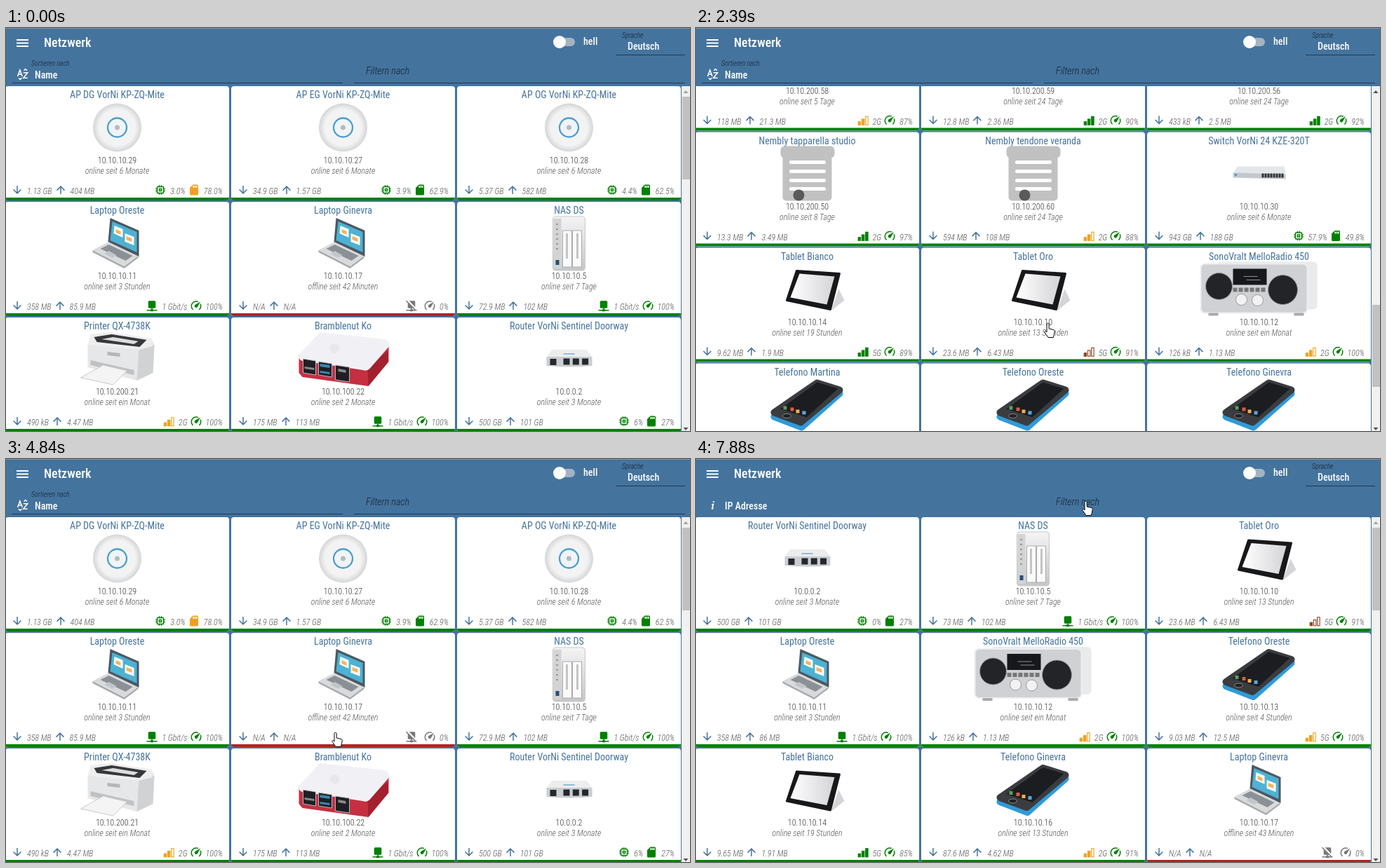
Animation, 975 px wide and 575 px high, one loop 8 s. Source, as an HTML page:

```html
<!DOCTYPE html>
<html lang="de">
<meta charset="utf-8">
<title>Netzwerk</title>
<style>
html, body { margin: 0; width: 975px; height: 575px; overflow: hidden }
body { position: relative; background: #44739e; color: #fff;
  font: 14px/20px "Roboto Condensed", Roboto, sans-serif; font-stretch: 75% }
.wide * { letter-spacing: -.055em }
body > *, .card, .card > * { position: absolute; white-space: nowrap }
.edge { inset: 0 0 auto; height: 1px; background: #87939e }
.line { height: 1px; background: #22394f }
.label { font: italic 300 10px/12px "Roboto Condensed", Roboto, sans-serif; font-stretch: 75%; color: #14222f }
.strong { font-weight: 500 }
.icon { width: 18px; height: 18px; fill: currentColor; flex: none }
.list { left: 0; top: 83px; width: 963px; height: 492px; overflow: hidden }
.card { height: 163px; background: #fff; border-radius: 4px; overflow: hidden; text-align: center; font-size: 12px; line-height: 14px; color: #555 }
.card > * { left: 0; right: 0 }
.name { top: 2px; font-size: 14px; line-height: 20px; color: #44739e }
.pic { top: 17px; width: 100%; height: 84px }
.ip { top: 99px; font-weight: 300; color: #333 }
.since { top: 114px; font-weight: 300; font-style: italic }
.stats { top: 139px; height: 18px; padding: 0 9px 0 8px; display: flex; align-items: center; font-weight: 300; font-style: italic }
.stats span { margin: 3px 3px 0 5px }
.stats span:last-child { margin-right: 0 }
.stats .icon { color: #44739e }
.stats i { flex: 1 }
.bar { bottom: 0; height: 4px }
.scroll { left: 963px; top: 83px; width: 12px; height: 492px; background: #f1f1f1 }
.thumb { left: 964px; width: 11px; height: 117.5px; background: #c1c1c1 }
.menu { left: 9px; top: 79px; width: 472px; height: 241px; background: #fff; border-radius: 4px; overflow: hidden;
  color: #44739e; box-shadow: 0 4px 8px #0006, 0 1px 3px #0005 }
.menu div { display: flex; align-items: center; gap: 10px; height: 34.4px; padding-left: 14px }
.menu .hover { background: #f6f6f6 }
.menu div:first-child { background: #dfdfdf }
.cursor { width: 24px; height: 26px; overflow: visible }
</style>
<body>
<svg width="0" height="0">
  <defs id="defs">
    <radialGradient id="dome"><stop offset=".75" stop-color="#f3f3f3"/><stop offset="1" stop-color="#d3d5d7"/></radialGradient>
    <linearGradient id="glass"><stop stop-color="#fff"/><stop offset="1" stop-color="#d4d4d8"/></linearGradient>
    <linearGradient id="shell" x2="0" y2="1"><stop stop-color="#f4f4f5"/><stop offset="1" stop-color="#c4c6c9"/></linearGradient>

    <path id="down" d="M11 4h2v12l5.5-5.5 1.42 1.42L12 19.84 4.08 11.92 5.5 10.5 11 16z"/>
    <use id="up" href="#down" transform="rotate(180 12 12)"/>
    <path id="chip" d="M17 17H7V7h10m4 4V9h-2V7a2 2 0 0 0-2-2h-2V3h-2v2h-2V3H9v2H7a2 2 0 0 0-2 2v2H3v2h2v2H3v2h2v2a2 2 0 0 0 2 2h2v2h2v-2h2v2h2v-2h2a2 2 0 0 0 2-2v-2h2v-2h-2v-2h2m-8 2h-2v-2h2m2-2H9v6h6z"/>
    <path id="sd" d="M18 2H10L4 8v12a2 2 0 0 0 2 2h12a2 2 0 0 0 2-2V4a2 2 0 0 0-2-2m-6 6h-2V4h2m3 4h-2V4h2m3 4h-2V4h2z"/>
    <path id="net" d="M17 3a2 2 0 0 1 2 2v10a2 2 0 0 1-2 2h-4v2h1a1 1 0 0 1 1 1h7v2h-7a1 1 0 0 1-1 1h-4a1 1 0 0 1-1-1H2v-2h7a1 1 0 0 1 1-1h1v-2H7a2 2 0 0 1-2-2V5a2 2 0 0 1 2-2z"/>
    <g id="off"><use href="#net"/><path d="M4 2l17 18" stroke="#fff" stroke-width="4"/><path d="M2 3l18 18" stroke="currentColor" stroke-width="2"/></g>
    <g id="linked"><use href="#net"/><path d="M8 10l3 3 5-6" fill="none" stroke="#fff" stroke-width="2"/></g>
    <path id="gauge" d="M12 16a3 3 0 0 1-3-3c0-1.12.61-2.1 1.5-2.61l9.71-5.62-5.53 9.58c-.5.98-1.51 1.65-2.68 1.65M12 3c1.81 0 3.5.5 4.97 1.32l-2.1 1.21C14 5.19 13 5 12 5a8 8 0 0 0-8 8c0 2.21.89 4.21 2.34 5.65.39.39.39 1.02 0 1.41-.39.39-1.03.39-1.42.01A9.97 9.97 0 0 1 2 13 10 10 0 0 1 12 3m10 10c0 2.76-1.12 5.26-2.93 7.07-.39.38-1.02.38-1.41-.01a1 1 0 0 1 0-1.41A7.95 7.95 0 0 0 20 13c0-1-.19-2-.54-2.9L20.67 8C21.5 9.5 22 11.18 22 13z"/>
    <use id="half" href="#gauge" transform="rotate(-45 12 13)"/>
    <path id="az" d="M2 16L6.5 4 11 16M4 12h5M13 9h8l-8 10h8M14 5l3-3 3 3M4 19l3 3 3-3" fill="none" stroke="currentColor" stroke-width="2"/>
    <path id="info" d="M13.5 4a1.5 1.5 0 1 0 .01 3 1.5 1.5 0 0 0 0-3m-.36 4.77c-1.19.1-4.44 2.69-4.44 2.69l.35.58 1.08-.68c2.12-1.36.34 1.78-.57 7.07-.36 2.62 2 1.27 2.61.87l2.37-1.61-.35-.57c-.65.43-1.84 1.33-2 .76-.19-.57 1.03-4.48 1.7-7.17.11-.64.41-2.04-.75-1.94z"/>
    <path id="clock" d="M12 21a9 9 0 1 1 9-9M12 7v6l4 2M14 18l3 3 5-5" fill="none" stroke="currentColor" stroke-width="2"/>

    <g id="ap"><circle r="34.5" fill="url(#dome)"/><circle r="13.5" fill="#f0f4f7" stroke="#4a9fd0" stroke-width="2.3"/><circle r="3.5" fill="#b5babf"/></g>
    <g id="laptop"><path fill="#a6a9ad" d="M-35 10L10 33 30 18v3L10 36-35 13z"/><path fill="#d9dadc" d="M-12-2L30 18 10 33-35 10z"/>
      <path fill="#8b9096" d="M-12 2L22 18 12 25-24 8z"/><path fill="#c3c6c9" d="M-18 15l6-4 11 6-6 4z"/>
      <path fill="#4c5862" d="M-10-36L31-18V19L-13-2z"/><path fill="#4db2d3" d="M-7-31L28-16V13L-10-4z"/>
      <path fill="#fff" d="M-4-25L8-20V-8L-5-14zM11-14l13 5v12L11-2z"/><path fill="#f2b45a" d="M-2-20l7 3v5l-7-3zM13-10l8 3v5l-8-3z"/></g>
    <g id="nas"><rect x="-23" y="-38" width="46" height="77" rx="4" fill="url(#shell)" stroke="#c9c9c9"/><path fill="#d2d3d5" d="M-22-35h11v71h-11z"/>
      <path fill="#fafafa" stroke="#aaa" d="M-9-18H4v52H-9zM5-18h13v52H5z"/><path stroke="#c4c4c4" stroke-width="3" d="M-3-14v36M12-14v36"/>
      <path stroke="#999" stroke-width="3" stroke-dasharray="2 5" d="M-17-28V14"/><path fill="#2b4d75" d="M-19 24h5v7h-5z"/></g>
    <g id="printer"><path fill="#e6e7e8" d="M-42-20L-35-24 50-26 53-20 51 20 28 31-42 12z"/><path fill="#d0d2d4" d="M31-13L53-20 51 20 28 31z"/>
      <path fill="#eee" d="M-38-35L-8-38 50-29V-18L31-13-42-20z"/><path fill="#36383a" d="M-33-31L-8-35 42-27 32-17-29-24z"/><path fill="#ddd" d="M-22-28L-6-31 30-25 24-21z"/>
      <path fill="#bfc1c3" d="M-38 2l62 14v7L-38 9z"/><path fill="#f4f4f4" stroke="#c8c8c8" d="M-52 27L-20 9 14 17-6 37z"/><path fill="#b4b6b8" d="M-14-10l18 2v5l-18-2z"/></g>
    <g id="berry"><path fill="#c62f42" d="M-63-6L35 12 65-20V4L36 39-58 26-63 20z"/><path fill="#a3202f" d="M35 14L64-12V5L36 39z"/>
      <path fill="#f1f1f5" d="M-33-38L58-28Q68-26 65-17L38 14Q34 18 28 16L-58 3Q-65 1-63-6z"/><circle cx="-12" cy="-15" r="7" fill="#e7e7ed"/>
      <path fill="#1d1f24" stroke="#b6b8bc" d="M-57 0l18 3v20l-18-3zM-35 4l19 3v19l-19-3zM-11 9L9 12v21L-11 30z"/><path fill="#3a86b5" d="M-33 7l14 2v4l-14-2zM-33 17l14 2v3l-14-2z"/><path fill="#888" d="M-55 11l14 2v3l-14-2zM-7 14l11 2v4l-11-2z"/></g>
    <g id="router"><path fill="#ededee" d="M-24-13H25L33-3H-32z"/><path fill="#cbced1" d="M-32-3H33V10Q0 13-32 10z"/><path d="M-8-7H8" stroke="#8bbde2" stroke-width="2"/>
      <path stroke="#24282c" stroke-width="9" stroke-dasharray="9 4.3" d="M-8 4H28"/><path fill="#24282c" d="M-27 0h9v9h-9z"/></g>
    <circle id="badge" cx="-12" cy="31" r="8" fill="#5a5a5a"/>
    <g id="fork"><g fill="none" stroke="#c1c1c1" stroke-width="8"><circle cx="-20" cy="-27" r="8"/><circle cx="21" cy="-27" r="8"/><circle cx="-20" cy="27" r="8"/><circle cx="21" cy="27" r="8"/>
      <path d="M-20-18C-20 8 21-8 21 18M21-18C21 8-20-8-20 18"/></g><use href="#badge"/></g>
    <g id="bulb"><path fill="#c1c1c1" d="M-25-13a25 25 0 0 1 50 0C25 2 13 6 13 16H-13C-13 6-25 2-25-13zM-13 20H13V31Q8 39 0 39-8 39-13 31z"/><use href="#badge"/></g>
    <g id="blind"><rect x="-38" y="-39" width="77" height="17" rx="6" fill="#c1c1c1"/><rect x="-35" y="-30" width="70" height="69" rx="5" fill="#c1c1c1"/>
      <path stroke="#fff" stroke-width="5" stroke-linecap="round" d="M-23-16H24M-23-3H24M-23 10H24M-23 22H24"/><use href="#badge"/></g>
    <g id="sensor"><g fill="none" stroke="#c1c1c1"><circle r="35" stroke-width="7"/><circle cx="11" cy="-18" r="16" stroke-width="5" stroke-dasharray="3 5.4"/></g>
      <path fill="#c1c1c1" d="M0-18a11 11 0 0 0 22 4L4-27zM-20 2q-12 16 0 17 10-1 0-17zM-8-6q-9 13 0 14 9-1 0-14zM-3 9q-8 12 0 13 8-1 0-13z"/><use href="#badge"/></g>
    <g id="tablet"><path fill="#d5d5d7" d="M45 0l8 16L34 31z"/><path fill="#17181a" stroke="#17181a" stroke-width="3" stroke-linejoin="round" d="M-15-26L46-22 33 29-29 16z"/><path fill="url(#glass)" d="M-11-22L39-18 28 22-24 12z"/></g>
    <g id="phone" stroke-linejoin="round"><path fill="#2f9bd8" stroke="#2f9bd8" stroke-width="10" d="M14-27L46-16-8 32-47 17z"/><path fill="#3b3c40" stroke="#3b3c40" stroke-width="10" d="M14-31L46-21-9 25-47 11z"/>
      <path fill="#1c1d20" d="M14-32L44-23-1 18-38 6z"/><ellipse cx="-29" cy="16" rx="6" ry="3" fill="#222" stroke="#888"/>
      <path fill="#5aa05a" d="M-34 2h5v5h-5z"/><path fill="#e05a3a" d="M-24 4h5v5h-5z"/><path fill="#f0b050" d="M-16 7h5v5h-5z"/><path fill="#58a8e0" d="M-7 9h5v5h-5z"/></g>
    <g id="radio"><rect x="-60" y="-39" width="143" height="68" rx="6" fill="#e9eaec"/><rect x="-83" y="-36" width="152" height="70" rx="6" fill="#cfd1d4" stroke="#eee" stroke-width="2"/>
      <path fill="#aaa" d="M-72 34h14v4h-14zM50 34h14v4H50z"/><g fill="#222427" stroke="#999"><circle cx="-57" cy="-4" r="19"/><circle cx="34" cy="1" r="21"/></g>
      <path fill="#16181b" d="M-37-29H11V-6H-37z"/><path stroke="#8a9096" d="M-22-18H-2M-18-13H2"/><path stroke="#777" stroke-width="6" stroke-dasharray="6 2" d="M-37 1H11"/>
      <g fill="#f2f2f3" stroke="#999"><circle cx="-25" cy="15" r="8"/><circle cx="-2" cy="16" r="8"/></g></g>
    <g id="tv"><path stroke="#333" d="M13-26L45-39M13-26L11-40"/><path fill="#fff" stroke="#000" stroke-width="8" d="M-41-18Q-38-27-6-27 29-27 31-18 35 18 29 30 0 37-34 30-42 6-41-18z"/>
      <path fill="none" stroke="#000" stroke-width="3" d="M-33-17l8 9 1-7 10 10 1-8 10 9 1-8 12 9 1-8 12 9M-34-2l9 9 1-8 10 10 1-8 10 9 1-8 12 9 1-8 12 9M-32 12l9 8 1-7 10 9 1-7 10 8 1-7 12 8"/></g>
    <g id="camera"><path fill="#ececec" d="M-55-24L12-40 46-8-8-20z"/><path fill="#c2c2c4" d="M-8-20L46-8V14L-8 32z"/><path fill="#e2e2e3" d="M-55-22H-8V32H-49z"/><path fill="#333" d="M-37-12h27v26h-27z"/><circle cx="-23" cy="1" r="7" fill="#111" stroke="#777"/><path fill="#aaa" d="M18 18h12v12h26v9H18z"/></g>
    <g id="switch"><path fill="#e4e7ea" d="M-31-10H36L38 0H-37z"/><path fill="#c2c8ce" d="M-37-1L38 1V8L-37 6z"/><path stroke="#333" stroke-width="6" stroke-dasharray="3 1" d="M4 3H35"/><circle cx="-33" cy="2" r="2" fill="#5b9fd0"/></g>

    <g stroke="#000" fill="#fff"><path id="arrow" d="M0 0v15l3.5-3.2 2.6 5.7 2.3-1-2.6-5.6h4.5z"/>
      <path id="hand" d="M-2 2c0-2.4 3.2-2.4 3.2 0v6l6 1.4c1.6.4 2.2 1.3 2 2.8l-.8 4.6L7.200 20.500H0L-4.800 13.500c-1-1.600.800-2.500 1.600-1.700L-2 13z"/></g>
  </defs>
</svg>
<div class="edge"></div>
<svg style="left:15px;top:15px" width="17" height="14"><path d="M0 2h17M0 6.500h17M0 11h17" stroke="#fff" stroke-width="2"/></svg>
<div class="strong" id="heading" style="left:54px;top:11px;font-size:18px">Netzwerk</div>
<svg style="left:778px;top:9px" width="36" height="22"><rect x="6" y="5" width="27" height="12" rx="6" fill="#a4b3c2"/><circle cx="11" cy="11" r="9" fill="#fff"/></svg>
<div class="strong" style="left:823px;top:9px">hell</div>
<div class="label" style="left:878px;top:5px">Sprache</div>
<div class="strong" style="left:886px;top:16px">Deutsch</div>
<div class="line" style="left:869px;top:38px;width:99px"></div>
<div class="label" id="sortLabel" style="left:36px;top:45px">Sortieren nach</div>
<div class="strong" id="sortValue" style="left:15px;top:57px;display:flex;gap:8px"></div>
<div class="line" id="sortLine" style="left:8px;top:78px;width:472px"></div>
<div class="label" style="left:513px;top:55px;font-size:14px">Filtern nach</div>
<div class="line" id="filterLine" style="left:496px;top:78px;width:472px"></div>
<div class="list"><div id="byName"></div><div id="byIp"></div></div>
<div class="scroll"></div>
<div class="thumb" id="thumb"></div>
<svg style="left:963px;top:83px" width="12" height="492"><path id="upArrow" d="M2.500 10h7L6 6z"/><path d="M2.500 487h7L6 491z" fill="#505050"/></svg>
<div class="menu" id="menu"></div>
<svg class="cursor" id="cursor"><use id="pointer"/></svg>

<script>
const $ = id => document.getElementById(id);
const GREEN = '#008000', ORANGE = '#f0a01e', GRAY = '#777';

// name | picture | address | since | received | sent | link | link value | quality
const devices = `AP DG VorNi KP-ZQ-Mite|ap|10.10.10.29|6 Monate|1.13 GB|404 MB|chip|3.0%|78.0%
AP EG VorNi KP-ZQ-Mite|ap|10.10.10.27|6 Monate|34.9 GB|1.57 GB|chip|3.9%|62.9%
AP OG VorNi KP-ZQ-Mite|ap|10.10.10.28|6 Monate|5.37 GB|582 MB|chip|4.4%|62.5%
Laptop Oreste|laptop|10.10.10.11|3 Stunden|358 MB|85.9 MB|net|1 Gbit/s|100%
Laptop Ginevra|laptop|10.10.10.17|42 Minuten|N/A|N/A|off||0%
NAS DS|nas|10.10.10.5|7 Tage|72.9 MB|102 MB|net|1 Gbit/s|100%
Printer QX-4738K|printer|10.10.200.21|ein Monat|490 kB|4.47 MB|s2|2G|100%
Bramblenut Ko|berry|10.10.100.22|2 Monate|175 MB|113 MB|net|1 Gbit/s|100%
Router VorNi Sentinel Doorway|router|10.0.0.2|3 Monate|500 GB|101 GB|chip|6%|27%
Nembly controllo portatile|fork|10.10.200.80|7 Tage|14.9 MB|1.81 MB|s1|2G|89%
Nembly luce studio|bulb|10.10.200.71|ein Monat|14.7 MB|4.2 MB|s3|2G|88%
Nembly luci bar|bulb|10.10.200.72|ein Monat|777 MB|134 MB|s2|2G|95%
Nembly luci salotto|bulb|10.10.200.70|24 Tage|12.7 MB|2.46 MB|s3|2G|85%
Nembly sensore H&amp;T 2. piano|sensor|10.10.200.90|19 Minuten|N/A|N/A|off||0%
Nembly sensore H&amp;T cantina|sensor|10.10.200.91|3 Stunden|N/A|N/A|off||0%
Nembly tapparella bagno|blind|10.10.200.52|12 Tage|9.24 MB|1.71 MB|s3|2G|95%
Nembly tapparella bambine|blind|10.10.200.54|24 Tage|436 kB|2.51 MB|s3|2G|100%
Nembly tapparella bambino|blind|10.10.200.51|14 Tage|9.17 MB|1.69 MB|s3|2G|92%
Nembly tapparella cucina|blind|10.10.200.57|15 Tage|12.9 MB|2.36 MB|s2|2G|87%
Nembly tapparella doccia|blind|10.10.200.55|12 Tage|462 kB|2.73 MB|s3|2G|93%
Nembly tapparella genitori|blind|10.10.200.53|3 Tage|13.7 MB|2.51 MB|s3|2G|95%
Nembly tapparella sala pranzo|blind|10.10.200.58|5 Tage|118 MB|21.3 MB|s2|2G|87%
Nembly tapparella salotto|blind|10.10.200.59|24 Tage|12.8 MB|2.36 MB|s3|2G|90%
Nembly tapparella stanza giochi|blind|10.10.200.56|24 Tage|433 kB|2.5 MB|s3|2G|92%
Nembly tapparella studio|blind|10.10.200.50|8 Tage|13.3 MB|3.49 MB|s3|2G|97%
Nembly tendone veranda|blind|10.10.200.60|24 Tage|594 MB|108 MB|s2|2G|88%
Switch VorNi 24 KZE-320T|switch|10.10.10.30|6 Monate|943 GB|188 GB|chip|57.9%|49.8%
Tablet Bianco|tablet|10.10.10.14|19 Stunden|9.62 MB|1.9 MB|s3|5G|89%
Tablet Oro|tablet|10.10.10.10|13 Stunden|23.6 MB|6.43 MB|s1|5G|91%
SonoVralt MelloRadio 450|radio|10.10.10.12|ein Monat|126 kB|1.13 MB|s2|2G|100%
Telefono Martina|phone|10.10.10.20|15 Stunden|324 MB|63 MB|s2|2G|69%
Telefono Oreste|phone|10.10.10.13|4 Stunden|9.03 MB|12.5 MB|s3|5G|100%
Telefono Ginevra|phone|10.10.10.16|13 Stunden|87.6 MB|4.6 MB|s2|2G|82%
Televisore Velkora|tv|10.10.10.22|2 Stunden|215 MB|9.4 MB|s3|5G|96%
Qevi security camera|camera|10.10.200.30|9 Tage|48.2 MB|310 MB|s2|2G|90%`.split('\n').map(row => row.split('|'));

// device index and the fields refreshed since the first listing
const ipOrder = [[8, {7: '0%'}], [5, {4: '73 MB'}], [28], [3, {5: '86 MB'}], [29], [31, {6: 's2'}],
  [27, {4: '9.65 MB', 5: '1.91 MB', 8: '85%'}], [32, {5: '4.62 MB', 8: '91%'}], [4, {3: '43 Minuten'}]];

const linkColors = {s1: '#9a3f1c', s2: ORANGE, off: GRAY};

const icon = (name, color = '') =>
  `<svg class="icon" viewBox="0 0 24 24" style="color:${color}"><use href="#${name}"/></svg>`;

function card([name, pic, ip, since, received, sent, link, value, quality], i) {
  const columns = i < 33 ? 3 : 2, column = i < 33 ? i % 3 : i - 33, pitch = 966 / columns;
  const row = Math.min(11, Math.floor(i / 3)), offline = link === 'off', level = parseFloat(quality);
  const second = link === 'chip' ? icon('sd', level > 75 ? ORANGE : GREEN)
    : offline ? icon('gauge', GRAY)
    : level < 70 ? icon('half', ORANGE) : icon('gauge', GREEN);
  return `<div class="card" style="left:${column * pitch - 1}px;top:${row * 165}px;width:${pitch - 3}px">
    <div class="name">${name}</div>
    <svg class="pic" viewBox="-90 -42 180 84"><use href="#${pic}"/></svg>
    <div class="ip">${ip}</div>
    <div class="since">${offline ? 'offline' : 'online'} seit ${since}</div>
    <div class="stats">${icon('down')}<span>${received}</span>${icon('up')}<span>${sent}</span><i></i>
      ${icon(link, linkColors[link] || GREEN)}<span>${value}</span>${second}<span>${quality}</span></div>
    <div class="bar" style="background:${offline ? '#b22222' : GREEN}"></div></div>`;
}

for (const level of [1, 2, 3]) {
  const bars = [0, 1, 2].map(n => `<rect x="${3 + 7 * n}" y="${15 - 5 * n}" width="4.500" height="${6 + 5 * n}"
    stroke="currentColor" stroke-width="1.500" fill="${n < level ? 'currentColor' : 'none'}"/>`);
  $('defs').insertAdjacentHTML('beforeend', `<g id="s${level}">${bars.join('')}</g>`);
}
$('byName').innerHTML = devices.map(card).join('');
$('byIp').innerHTML = ipOrder.map(([n, patch], i) => card(Object.assign([...devices[n]], patch), i)).join('');

const options = [['az', 'Name'], ['info', 'IP Adresse'], ['linked', 'Verbunden'], ['down', 'Daten empfangen'],
  ['up', 'Daten gesendet'], ['gauge', 'Erlebnis'], ['clock', 'Betriebszeit']];
const option = ([name, text]) => `${icon(name)}<span>${text}</span>`;
$('menu').innerHTML = options.map(o => `<div>${option(o)}</div>`).join('');

// tighten the text where no condensed face is installed
if ($('heading').offsetWidth > 71) document.body.classList.add('wide');

// keys are [step, values...]
const scrollKeys = [[-1, 0], [0, 8], [3, 192.5], [8, 1254.5], [10, 1488], [11, 1488], [12, 1391], [16, 688.5], [20, 0]];
const cursorKeys = [[0, 501, 423], [3, 501, 423], [8, 502, 421], [12, 502, 421], [16, 496, 412], [20, 470, 390],
  [22, 130, 68], [24, 115, 90], [26, 115, 143], [27, 108, 128], [29, 108, 128], [34, 556, 60]];

function sample(keys, step) {
  const next = keys.findIndex(key => key[0] > step);
  if (next < 1) return keys.at(next).slice(1);
  const a = keys[next - 1], b = keys[next], f = (step - a[0]) / (b[0] - a[0]);
  return a.slice(1).map((v, i) => v + (b[i + 1] - v) * f);
}

const show = (id, on) => $(id).style.visibility = on ? 'visible' : 'hidden';

function draw(step) {
  const [scroll] = sample(scrollKeys, step), [x, y] = sample(cursorKeys, Math.max(0, step));
  const open = step >= 23 && step < 29, sorted = step >= 29;
  $('byName').style.cssText = `display:${sorted ? 'none' : 'block'};transform:translateY(${-scroll}px)`;
  $('byIp').style.display = sorted ? 'block' : 'none';
  $('thumb').style.top = 98 + scroll * .2365 + 'px';
  $('upArrow').style.fill = scroll ? '#505050' : '#a3a3a3';
  $('sortValue').innerHTML = option(options[sorted ? 1 : 0]);
  show('sortLabel', step < 23);
  show('sortLine', step < 22);
  show('filterLine', step < 35);
  show('menu', open);
  [...$('menu').children].forEach((item, i) => item.className = i === Math.floor((y - 79) / 34.4) ? 'hover' : '');
  show('cursor', step >= 0);
  $('cursor').style.transform = `translate(${x}px,${y}px)`;
  $('cursor').style.left = $('cursor').style.top = 0;
  $('pointer').setAttribute('href', step < 5 ? '#arrow' : '#hand');
  $('pointer').setAttribute('fill', '#fff');
  $('pointer').setAttribute('stroke', '#000');
}

let shown;
function tick() {
  const step = Math.max(-1, Math.floor((performance.now() % 8000 - 746) / 203.7));
  if (step !== shown) draw(shown = step);
  requestAnimationFrame(tick);
}
tick();
</script>
</body>
</html>
```
